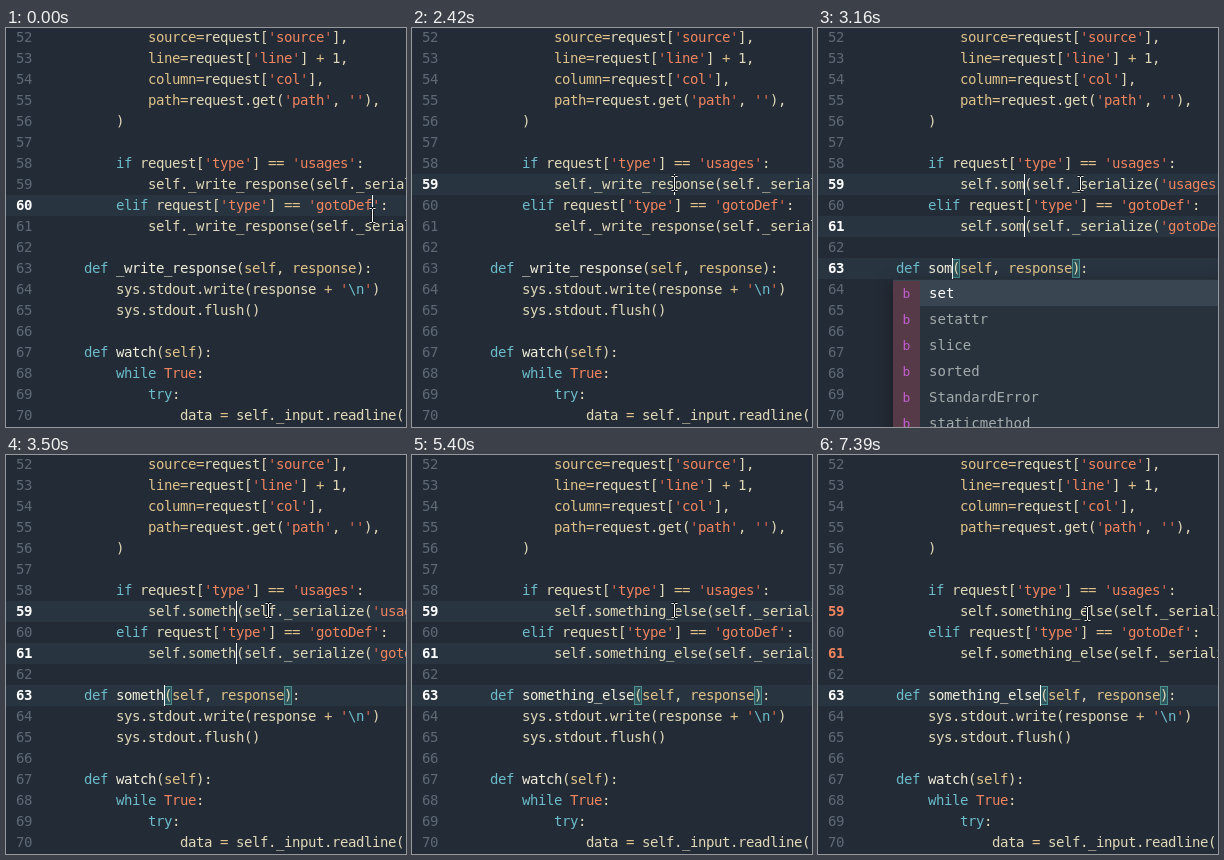
Animation of 400x399 px, one loop 7700 ms. Source, as an HTML page:

```html
<!DOCTYPE html>
<html lang="en">
<head>
<meta charset="utf-8">
<title>Renaming with several cursors</title>
<style>
  html, body { margin: 0; width: 100%; height: 100%; overflow: hidden; background: #232b36; }
  #stage {
    position: relative; width: 400px; height: 399px; overflow: hidden;
    background: #232b36; color: #e0d8b8;
    font: 14px/21px "DejaVu Sans Mono", monospace;
    letter-spacing: calc(8px - 1ch);
  }
  #stage div, .num, .code { position: absolute; top: 0; left: 0; }
  .row { width: 400px; height: 21px; }
  #rows .active { background: #283440; }
  #stage .num { left: 10px; color: #5e6975; }
  #stage .code { left: 46px; white-space: pre; }
  #stage .active .num { color: #fff; font-weight: bold; }
  #stage .edited .num { color: #f0845f; font-weight: bold; }
  .key, .esc { color: #6cbccb; }
  .str, .const { color: #f0845f; }
  .quote { color: #dc6b50; }
  .arg, .op { color: #dfc28a; }
  .fn { color: #f1eddb; }
  .caret { width: 1px; height: 21px; background: #fff; }
  .pick { height: 21px; background: #3c4b59; }
  .bracket {
    box-sizing: border-box; width: 8px; height: 19px;
    background: #2d555b; border: 1px solid #4b8f8f;
  }
  #stage #popup {
    left: 75px; top: 251px; width: 340px; height: 160px; padding-top: 1px;
    background: #28323d; color: #a3aaab; line-height: 26px;
    letter-spacing: calc(8.45px - 1ch); box-shadow: 0 4px 16px rgba(0, 0, 0, .35);
  }
  #popup p { margin: 0; height: 26px; }
  #popup p:first-child { background: #394652; color: #fff; }
  #popup i {
    display: inline-block; width: 27px; margin-right: 9px; text-align: center;
    background: #573a47; color: #c25fd0; font-style: normal; font-size: 13px;
  }
  #mouse svg { display: block; }
</style>
</head>
<body>
<div id="stage">
  <div id="rows"></div>
  <div id="marks"></div>
  <div id="texts"></div>
  <div id="carets"></div>
  <div id="popup"></div>
  <div id="mouse">
    <svg width="9" height="17" fill="none">
      <defs><path id="beam" d="M1.5 1.5H3.5L4.5 2.5L5.5 1.5H7.5M4.5 2V15M1.5 15.5H3.5L4.5 14.5L5.5 15.5H7.5"/></defs>
      <use href="#beam" stroke="#11161c" stroke-width="3"/>
      <use href="#beam" stroke="#fff"/>
    </svg>
  </div>
</div>
<script>
const LOOP = 7700, FIRST = 52, CELL = 8, LEFT = 46;
const OLD = '_write_response', NEW = 'something_else';
const lines = String.raw`            source=request['source'],
            line=request['line'] + 1,
            column=request['col'],
            path=request.get('path', ''),
        )

        if request['type'] == 'usages':
            self.@(self._serialize('usages', response))
        elif request['type'] == 'gotoDef':
            self.@(self._serialize('gotoDef', response))

    def @(self, response):
        sys.stdout.write(response + '\n')
        sys.stdout.flush()

    def watch(self):
        while True:
            try:
                data = self._input.readline()`.split('\n');

// Moments of each key press, blink and stretch of mouse travel (ms)
const keys = [2860, 3120, 3160, 3290, 3330, 3500, 3540, 3650, 3740, 4050, 4450, 4770, 4950, 4950];
const blinks = [380, 770, 1180, 1630, 2040, 2420, 5400, 5790, 6210, 6600, 7000, 7390];
const CLICK = 1630, SELECT = 2460, MATCH = 2500, ESCAPE = 5790;
const path = [
  [0, 366, 187], [90, 366, 187], [460, 329, 162], [730, 329, 162],
  [1180, 275, 151], [1260, 265, 149], [1410, 265, 149], [1860, 262, 155],
  [6600, 262, 155], [6770, 262, 153], [7270, 262, 153], [7390, 269, 158], [LOOP, 269, 158]
];

const el = id => document.getElementById(id);
const lineY = n => (n - FIRST) * 21 - 1;
const nameX = n => LEFT + CELL * lines[n - FIRST].indexOf('@');
const span = (cls, s) => `<span class="${cls}">${s}</span>`;
const passed = (times, t) => times.filter(x => x <= t).length;
const box = (cls, x, y, more = '') =>
  `<div class="${cls}" style="left:${x}px;top:${y}px;${more}"></div>`;

function paint(line) {
  const isDef = /^ *def /.test(line);
  const token = /'(?:\\.|[^'])*'|\w+|[=+]+/g;
  return line.replace(token, (s, at) => {
    if (s[0] === "'") {
      const body = s.slice(1, -1).replace(/\\./g, e => span('esc', e));
      return span('quote', "'") + span('str', body) + span('quote', "'");
    }
    if (/^(def|if|elif|while|try)$/.test(s)) return span('key', s);
    if (s === 'True') return span('const', s);
    if (/^[=+]/.test(s)) return span('op', s);
    if (isDef) return span(line.slice(0, at).endsWith('def ') ? 'fn' : 'arg', s);
    return /^=\w/.test(line.slice(at + s.length)) ? span('arg', s) : s;
  });
}

// Backgrounds and text are separate layers, with the marks between them
function addRows(id, inner) {
  el(id).innerHTML = lines.map((line, i) =>
    `<div class="row" style="top:${lineY(FIRST + i)}px">${inner(line, i)}</div>`).join('');
  return [...el(id).children];
}
const bands = addRows('rows', () => '');
const texts = addRows('texts', (line, i) =>
  span('num', FIRST + i) + span('code', paint(line.replace('@', OLD))));

el('popup').innerHTML = ['set', 'setattr', 'slice', 'sorted', 'StandardError', 'staticmethod']
  .map(word => `<p><i>b</i>${word}</p>`).join('');

let shownName = OLD;

function setName(name) {
  if (name === shownName) return;
  shownName = name;
  lines.forEach((line, i) => {
    if (line.includes('@')) texts[i].lastChild.innerHTML = paint(line.replace('@', name));
  });
}

function moveMouse(t) {
  const i = path.findIndex(p => t < p[0]);
  const [t0, x0, y0] = path[i - 1], [t1, x1, y1] = path[i];
  const k = (t - t0) / (t1 - t0);
  const x = Math.round(x0 + (x1 - x0) * k) - 4, y = Math.round(y0 + (y1 - y0) * k) - 8;
  el('mouse').style.transform = `translate(${x}px, ${y}px)`;
}

function render(t) {
  const typed = passed(keys, t);
  const name = typed ? NEW.slice(0, typed) : OLD;
  const width = CELL * name.length;
  const active = t < CLICK ? [60] : t < SELECT ? [59] : t < ESCAPE ? [59, 61, 63] : [63];
  setName(name);

  lines.forEach((line, i) => {
    const on = active.includes(FIRST + i);
    bands[i].classList.toggle('active', on);
    texts[i].classList.toggle('active', on);
    texts[i].classList.toggle('edited', t >= ESCAPE && !on && line.includes('@'));
  });

  let marks = '';
  if (t >= SELECT && !typed)
    marks += active.map(n => box('pick', nameX(n), lineY(n), `width:${width}px`)).join('');
  if (t >= MATCH)
    marks += [0, 15].map(c => box('bracket', nameX(63) + width + CELL * c, lineY(63) + 1)).join('');
  el('marks').innerHTML = marks;

  const caretX = n => t < CLICK ? 366 : t < SELECT ? 262 : nameX(n) + width;
  const lit = passed(blinks, t) % 2 === 0;
  el('carets').innerHTML = lit ? active.map(n => box('caret', caretX(n), lineY(n))).join('') : '';

  el('popup').style.display = t >= 2950 && t < 3200 ? 'block' : 'none';
  moveMouse(t);
}

const start = performance.now();
function tick() {
  render((performance.now() - start) % LOOP);
  requestAnimationFrame(tick);
}
tick();
</script>
</body>
</html>
```
